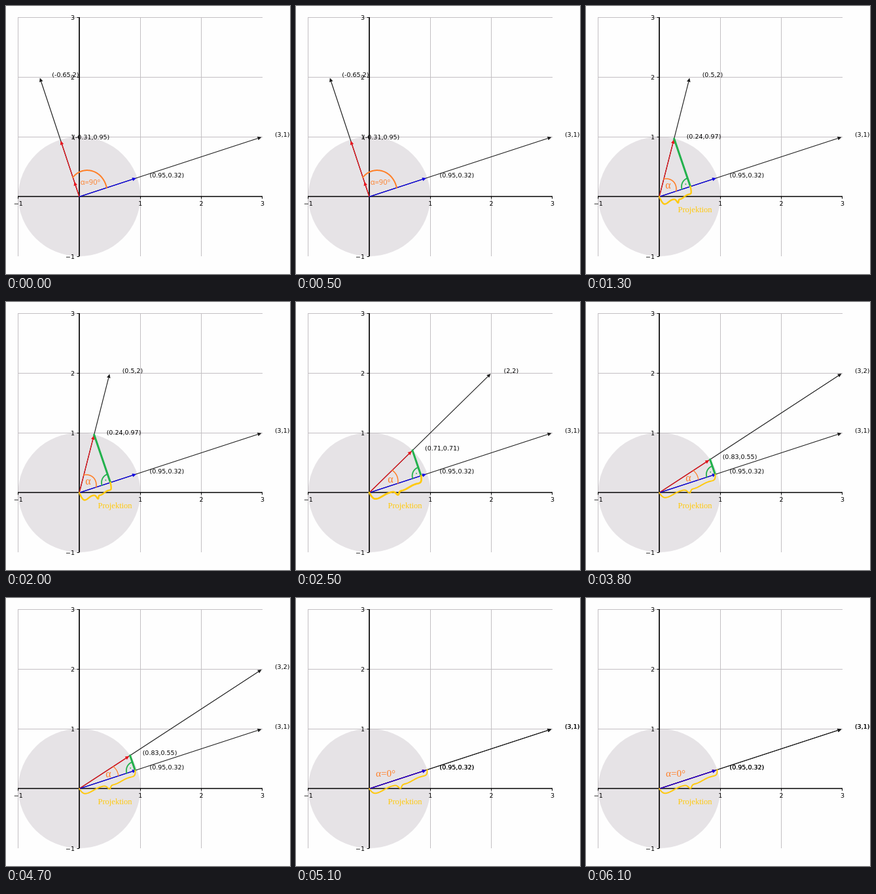
An HTML page with a canvas for the animation above (6.3 s loop, 434 px wide and 408 px high).

```html
<!DOCTYPE html>
<html lang="de">
<head>
<meta charset="utf-8">
<title>Projektion</title>
<style>
  html, body { margin: 0; width: 100%; height: 100%; overflow: hidden; background: #fefefe; }
  canvas { display: block; }
</style>
</head>
<body>
<canvas id="stage" width="434" height="408"></canvas>
<script>
const ctx = document.getElementById('stage').getContext('2d');
const LOOP = 6300;
const ORANGE = '#ff7f27', GOLD = '#ffc90e', GREEN = '#22b14c';
const RED = '#e8141c', BLUE = '#0a00e6', BLACK = '#000', INK = '#1c1c1c', GRID = '#c3bfc3';
const SANS = '9.5px "DejaVu Sans", sans-serif';
const serif = size => `${size}px "Liberation Serif", serif`;

const px = x => 112 + 93.3 * x;
const py = y => 290.3 - 91.1 * y;
const scale = ([x, y], k) => [x * k, y * k];
const normalize = v => scale(v, 1 / Math.hypot(...v));
const toStage = ([x, y]) => [px(x), py(y)];

const ORIGIN = toStage([0, 0]);
const BASE = [3, 1];
const BASE_UNIT = normalize(BASE);

// radii: where the angle arc meets the two vectors; at: centre of the angle text
const scenes = [
  { start: 0, vector: [-0.65, 2], angle: 'α=90°', font: '11px "Open Sans", sans-serif',
    at: [129, 272], radii: [44, 31], arcWidth: 2, rightAngle: true },
  { start: 1200, vector: [0.5, 2], angle: 'α', font: serif(16),
    at: [125.5, 278], radii: [27, 28], arcWidth: 1.6, depth: 12, braceWidth: 2.4 },
  { start: 2400, vector: [2, 2], angle: 'α', font: serif(16),
    at: [144.5, 275], radii: [46, 49], arcWidth: 1.5, depth: 11, braceWidth: 2.8 },
  { start: 3700, vector: [3, 2], angle: 'α', font: serif(16),
    at: [156.5, 273], radii: [63, 62], arcWidth: 1.2, depth: 9, braceWidth: 2 },
  { start: 5000, vector: BASE, angle: 'α=0°', font: serif(15),
    at: [137, 271.5], depth: 8.5, braceWidth: 2 }
];

function stroke(points, color, width) {
  ctx.strokeStyle = color;
  ctx.lineWidth = width;
  ctx.beginPath();
  for (const p of points) ctx.lineTo(...p);
  ctx.stroke();
}

// Strokes a parametric curve for s from 0 to 1.
function curve(pointAt, color, width, steps = 100) {
  stroke(Array.from({ length: steps + 1 }, (_, i) => pointAt(i / steps)), color, width);
}

function text(str, x, y, color = BLACK, font = SANS, align = 'left') {
  ctx.font = font;
  ctx.fillStyle = color;
  ctx.textAlign = align;
  ctx.fillText(str, x, y);
}

const direction = ([x1, y1], [x2, y2]) => Math.atan2(y2 - y1, x2 - x1);
const polar = ([x, y], r, a) => [x + r * Math.cos(a), y + r * Math.sin(a)];

function arrow(v, color, width) {
  const end = toStage(v);
  const a = direction(ORIGIN, end);
  const tip = polar(end, -1.5, a);
  const neck = polar(tip, -6, a);
  stroke([ORIGIN, neck], color, width);
  ctx.fillStyle = color;
  ctx.beginPath();
  ctx.moveTo(...tip);
  ctx.lineTo(...polar(neck, 2.8, a + Math.PI / 2));
  ctx.lineTo(...polar(neck, 2.8, a - Math.PI / 2));
  ctx.fill();
}

function label([x, y]) {
  const round = v => Number(v.toFixed(2));
  text(`(${round(x)},${round(y)})`, px(x) + 19, py(y) - 0.3);
}

function drawPlot() {
  ctx.fillStyle = '#fefefe';
  ctx.fillRect(0, 0, 434, 408);
  ctx.fillStyle = '#e6e3e6';
  ctx.beginPath();
  ctx.ellipse(112, 290, 93.3, 91, 0, 0, 2 * Math.PI);
  ctx.fill();

  ctx.lineCap = 'butt';
  const snap = v => Math.floor(v) + 0.5;
  for (const v of [-1, 1, 2, 3]) {
    const x = snap(px(v)), y = snap(py(v));
    if (v < 3) stroke([[x, 17], [x, 381]], GRID, 1);
    if (v > 0) stroke([[18, y], [392, y]], GRID, 1);
  }
  stroke([[112, 17], [112, 381]], BLACK, 1.7);
  stroke([[18, 290], [392, 290]], BLACK, 1.7);
  for (const v of [-1, 1, 2, 3]) {
    const x = snap(px(v)), y = snap(py(v));
    const name = String(v).replace('-', '−');
    stroke([[x, 290], [x, 293.5]], BLACK, 1);
    stroke([[108.5, y], [112, y]], BLACK, 1);
    text(name, px(v), 304, BLACK, SANS, 'center');
    text(name, 105, py(v) + 3.5, BLACK, SANS, 'right');
  }
}

// Angle arc with a hand-drawn bulge that grows with the opening.
function drawArc(unit, [from, to], width) {
  const a = direction(ORIGIN, toStage(BASE_UNIT));
  const turn = direction(ORIGIN, toStage(unit)) - a;
  const bulge = 4 * Math.abs(turn);
  curve(s => polar(ORIGIN, from + (to - from) * s + bulge * Math.sin(Math.PI * s), a + turn * s),
    ORANGE, width);
}

// Perpendicular onto the base vector with its right-angle mark.
function drawDrop(tip, foot) {
  const back = direction(foot, ORIGIN);
  const turn = direction(foot, tip) + 2 * Math.PI - back;
  stroke([tip, foot], GREEN, 3);
  curve(s => polar(foot, 13.5, back + turn * s), GREEN, 1.8);
  const [x, y] = polar(foot, 8, back + turn / 2);
  ctx.fillStyle = GREEN;
  ctx.fillRect(x - 0.8, y - 0.8, 1.6, 1.6);
}

// Curly brace below the projected length: flat body, wavy, with a cusp near the middle.
function drawBrace(foot, depth, width) {
  const a = direction(ORIGIN, foot);
  const length = Math.hypot(foot[0] - ORIGIN[0], foot[1] - ORIGIN[1]);
  const profile = s => {
    const body = 1 - Math.abs(2 * s - 1) ** 20;
    const wave = 1.5 * Math.cos(4 * Math.PI * (s - 0.1));
    const cusp = 5.5 * Math.exp(-(((s - 0.49) / 0.035) ** 2));
    return body * (depth + wave) + cusp;
  };
  curve(s => polar(polar(ORIGIN, length * s, a), profile(s), a + Math.PI / 2), GOLD, width);
  text('Projektion', 140.5, 314, GOLD, serif(12.5));
}

function drawScene(s) {
  const unit = normalize(s.vector);
  const dot = unit[0] * BASE_UNIT[0] + unit[1] * BASE_UNIT[1];
  const foot = toStage(scale(BASE_UNIT, dot));

  for (const v of [BASE, s.vector]) {
    arrow(v, INK, 1.15);
    label(v);
    label(normalize(v));
  }
  arrow(unit, RED, 1.3);
  if (s.rightAngle) arrow(scale(unit, 0.28), RED, 1);
  arrow(BASE_UNIT, BLUE, 1.3);

  ctx.lineCap = ctx.lineJoin = 'round';
  if (s.depth && s.vector !== BASE) drawDrop(toStage(unit), foot);
  if (s.radii) drawArc(unit, s.radii, s.arcWidth);
  if (s.depth) drawBrace(foot, s.depth, s.braceWidth);
  text(s.angle, ...s.at, ORANGE, s.font, 'center');
}

function frame() {
  const t = performance.now() % LOOP;
  drawPlot();
  drawScene(scenes.findLast(s => t >= s.start));
  requestAnimationFrame(frame);
}
frame();
</script>
</body>
</html>
```
